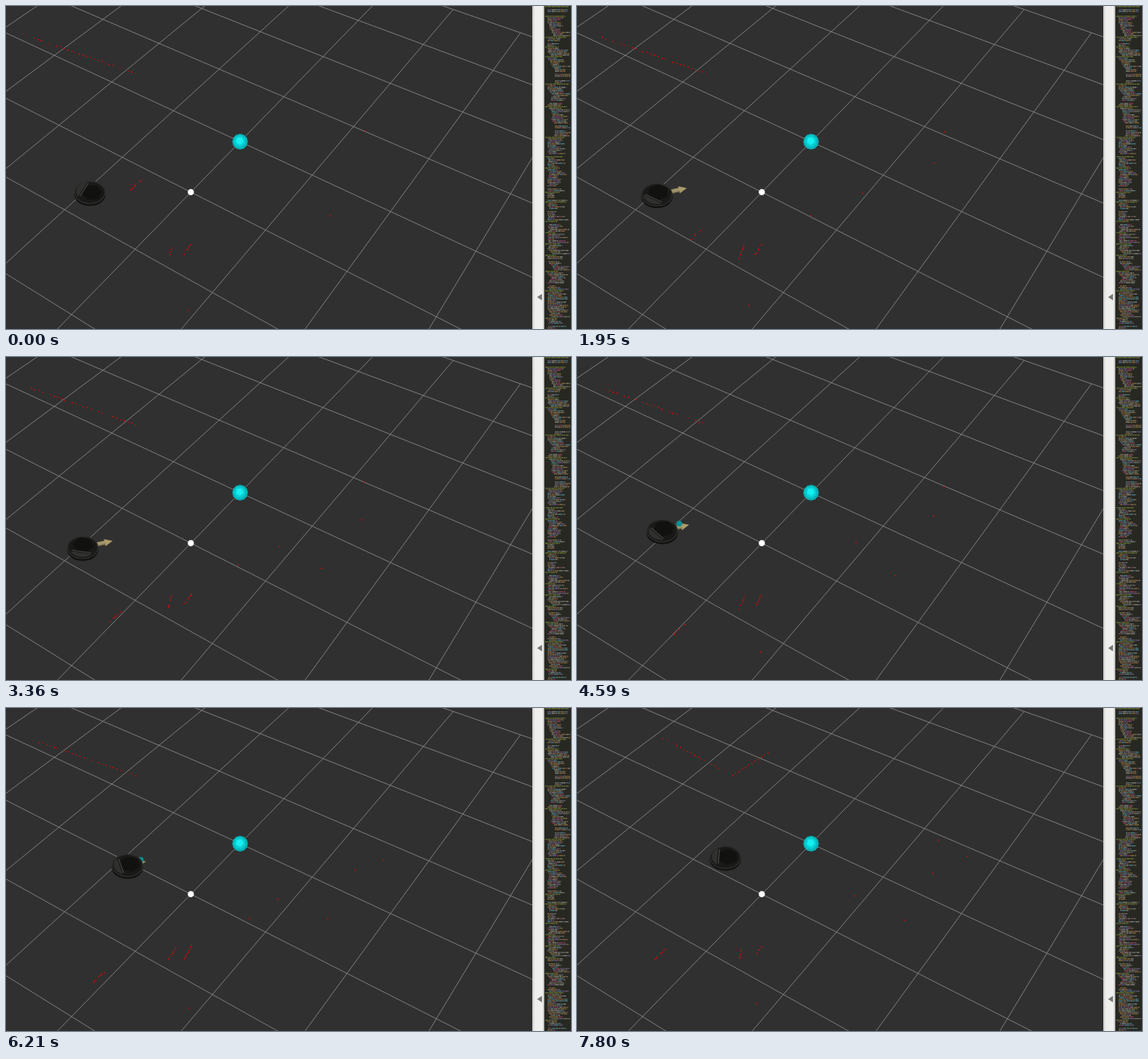
An HTML page with a canvas for the animation above (8 s loop, 700 px wide and 400 px high).

```html
<!DOCTYPE html>
<html>
<head>
<meta charset="utf-8">
<style>
html, body { margin: 0; width: 100%; height: 100%; overflow: hidden; background: #303030; }
canvas { display: block; }
</style>
</head>
<body>
<canvas id="stage" width="700" height="400"></canvas>
<script>
const ctx = document.getElementById('stage').getContext('2d');
const LOOP = 8000;
const TURNBACK = 3300; // the robot backs off, then drives forward

function seeded(s) {
  return () => (s = (s * 16807) % 2147483647) / 2147483647;
}

const mix = (a, b, p) => a + (b - a) * p;
const clamp = v => Math.max(0, Math.min(1, v));
const smooth = p => p * p * (3 - 2 * p);

function line(x1, y1, x2, y2, color, width = 1) {
  ctx.strokeStyle = color;
  ctx.lineWidth = width;
  ctx.beginPath();
  ctx.moveTo(x1, y1);
  ctx.lineTo(x2, y2);
  ctx.stroke();
}

function shape(points, color) {
  ctx.fillStyle = color;
  ctx.beginPath();
  points.forEach(([x, y]) => ctx.lineTo(x, y));
  ctx.fill();
}

function rect(x, y, w, h, color) {
  ctx.fillStyle = color;
  ctx.fillRect(x, y, w, h);
}

function disc(x, y, rx, ry, color) {
  ctx.fillStyle = color;
  ctx.beginPath();
  ctx.ellipse(x, y, rx, ry, 0, 0, 7);
  ctx.fill();
}

const ring = (x, y, r, n, turn = 0) => Array.from({ length: n }, (_, i) => {
  const a = turn + i * 2 * Math.PI / n;
  return [x + r * Math.cos(a), y + r * Math.sin(a)];
});

// Floor coordinates to screen; the ball stands at (0, 0)
function floor(i, j) {
  const u = -0.0396 * i, v = 0.0585 * j, w = 1 + u + v;
  return [(290 - 1877 * u + 1271 * v) / w, (168 - 838 * (u + v)) / w];
}

function drawGrid() {
  for (let k = -5; k <= 5; k++) {
    if (k < 5) line(...floor(-5, k), ...floor(5, k), '#8c8c8c', 0.8);
    line(...floor(k, -5), ...floor(k, 4), '#8c8c8c', 0.8);
  }
}

function drawBall() {
  shape(ring(290, 168, 9.7, 12), '#06b3b8');
  shape(ring(289.5, 167.5, 7.5, 7, 0.4), '#06d0d4');
  shape(ring(289.5, 167, 5, 5, 0.2), '#14f0f2');
  shape(ring(229, 230.5, 4, 8, 0.4), '#fff');
}

function drawScan(time) {
  const rnd = seeded(Math.round(time) * 7 + 77);
  const dot = (x, y, size = 1.4) => rect(Math.round(x), Math.round(y), size, size, '#e80505');
  const stroke = (x1, y1, x2, y2, gap = 5) => {
    const n = Math.ceil(Math.hypot(x2 - x1, y2 - y1) / gap);
    for (let i = 0; i <= n; i++) {
      if (rnd() < 0.75) dot(mix(x1, x2, i / n), mix(y1, y2, i / n), 1 + rnd() * 0.6);
    }
  };

  // Back wall; its corner comes into view late
  const start = 20 + 60 * rnd();
  if (time > 6400) {
    stroke(95 + start / 4, 31 + start / 8, 192, 83);
    stroke(192, 83, 225 + start / 3, 62 - start / 5);
  } else {
    stroke(start, 34 + start * 0.36 - 7, 160, 83);
  }

  // A passing object, then two legs that stay
  const p = time / LOOP;
  const x = 160 - 60 * p, y = 222 + 118 * Math.sin(2.45 * p);
  stroke(x - 6, y + 5, x, y - 2, 2.4);
  stroke(x, y - 2, x + 7, y - 7, 3);
  const lean = 8 * rnd();
  stroke(200, 312, 203 + lean, 296, 3);
  stroke(220, 304 + lean, 229, 293, 2.6);

  // Stray returns
  const strays = [[220, 368], [295, 257], [345, 232], [400, 265], [435, 200], [475, 190], [448, 156]];
  if (time > 6400) strays.push([545, 80], [575, 85]);
  for (const [sx, sy] of strays) {
    const dx = 20 * rnd() - 10, dy = 16 * rnd() - 8;
    if (rnd() < 0.7) dot(sx + dx, sy + dy);
  }
}

function poseAt(time) {
  const s = clamp(time / TURNBACK), u = clamp((time - TURNBACK) / (LOOP - 200 - TURNBACK));
  return {
    x: 104 - 9 * s + 89 * smooth(u ** 1.2),
    y: 231 + 5 * s - 51 * (1 - (1 - u) ** 1.6),
    turn: 205 - 105 * s ** 0.4 + 85 * u ** 0.6,
    arrow: 8 + 30 * clamp(time / 1700) - 30 * u ** 1.6,
    marker: 24 * Math.sin(Math.PI * u ** 0.7)
  };
}

function drawArrow(x, y, len) {
  ctx.save();
  ctx.translate(x, y);
  ctx.rotate(-0.22);
  shape([[0, -2.5], [len - 9, -2.5], [len - 9, 2.5], [0, 2.5]], '#a0946a');
  shape([[len - 10, -4.5], [len, 0], [len - 10, 4.5]], '#aa9c6a');
  line(0, 2, len - 9, 2, '#746a48');
  ctx.restore();
}

function drawRobot(time) {
  const { x, y, turn, arrow, marker } = poseAt(time);
  drawArrow(x, y, arrow);
  disc(x + marker * 0.92, y - marker * 0.39, 3.5, 3.5, '#0b8f96');
  disc(x, y + 2.5, 19.5, 14, '#101010');
  disc(x, y, 19.5, 14.5, '#2c2c2a');
  disc(x, y, 18, 13, '#191918');
  ctx.save();
  ctx.translate(x, y - 1);
  ctx.scale(1, 0.75);
  ctx.rotate(turn * Math.PI / 180);
  ctx.fillStyle = '#30302e';
  ctx.beginPath();
  ctx.arc(0, 0, 17, -0.95, 0.95);
  ctx.fill();
  shape(ring(-3, 0, 13, 6, 0.5), '#111110');
  line(8, -12, 8, 12, '#454541', 1.2);
  ctx.restore();
}

function drawCode() {
  const bar = ctx.createLinearGradient(652, 0, 667, 0);
  bar.addColorStop(0, '#c4c4c2');
  bar.addColorStop(0.2, '#eeeeec');
  bar.addColorStop(0.85, '#f0f0ee');
  bar.addColorStop(1, '#a4a4a2');
  rect(652, 0, 15, 400, bar);
  shape([[658, 360.5], [664, 356.5], [664, 364.5]], '#777');
  rect(667, 0, 33, 400, '#272822');

  const rnd = seeded(4242);
  const inks = ['#77776f', '#77776f', '#66665e', '#47747e', '#7c3d50', '#7a6338', '#5f5273', '#806040'];
  const words = (x, y, end, pick) => {
    while (x < end) {
      const w = Math.min(1 + rnd() * 5, end - x);
      rect(x, y, w, 1.4, pick());
      x += w + 0.6;
    }
  };
  const anyInk = () => inks[Math.floor(rnd() * inks.length)];
  let left = 0, indent = 4;
  for (let y = 0; y < 400; y += 2) {
    if (left-- <= 0) {
      left = 5 + Math.floor(rnd() * 14);
      indent = 3;
      words(668, y, 680 + rnd() * 18, () => '#616a30');
    } else if (rnd() < 0.9) {
      indent = Math.max(3, Math.min(12, indent + Math.floor(rnd() * 5) - 2));
      words(668 + indent, y, Math.min(699, 676 + indent + rnd() * 18), anyInk);
    }
  }
}

function draw(time) {
  rect(0, 0, 700, 400, '#303030');
  drawGrid();
  drawBall();
  drawScan(time);
  drawRobot(time);
  drawCode();
}

// Scans arrive in pairs: one on the beat, one shortly after
function lastUpdate(now) {
  if (now < 80) return 0;
  const beat = 80 + Math.floor((now - 80) / 210) * 210;
  return now - beat < 60 ? beat : beat + 60;
}

let shown = -1;
function frame() {
  const update = lastUpdate(performance.now() % LOOP);
  if (update !== shown) draw(shown = update);
  requestAnimationFrame(frame);
}
frame();
</script>
</body>
</html>
```
